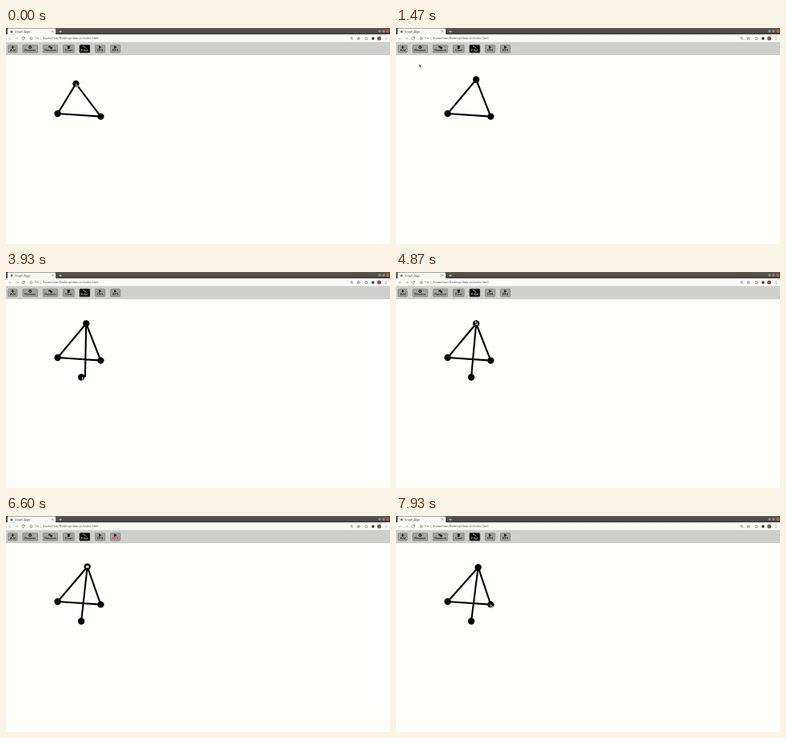
These frames come from a looping animation (480 by 270 pixels, 8000 ms). An HTML page:

```html
<!DOCTYPE html>
<html lang="en">
<head>
<meta charset="utf-8">
<title>Graph Algo</title>
<style>
  html, body { margin: 0; width: 100%; height: 100%; overflow: hidden; background: #fefefb; }
  svg { display: block; width: 100vw; height: 100vh; }
  text { font-family: "Open Sans", "Noto Sans", sans-serif; font-size: 3.7px; fill: #4a4a47; }
  .btn rect { fill: #a1a19d; stroke: #72726e; stroke-width: .6; }
  .btn text { font: bold 3.6px "Liberation Sans", sans-serif; fill: #2b2b29; text-anchor: middle; }
  .btn path { fill: none; stroke: #111; stroke-width: .9; }
  .btn .solid { fill: #111; stroke: none; }
  .btn.on rect { fill: #050505; stroke: #222; }
  .btn.on text { fill: #a5a5a1; }
  .btn.on path { stroke: #b5b5b0; }
  .btn.busy rect { fill: #414b5c; stroke: #2c3442; }
  .btn.busy text { fill: #141b28; }
  .btn.red text { fill: #e2382c; }
  .edge { stroke: #000; stroke-width: 2.1; }
  .ui { fill: none; stroke: #666662; stroke-width: .6; }
</style>
</head>
<body>
<svg viewBox="0 0 480 270" preserveAspectRatio="none">
  <defs>
    <linearGradient id="bar" x2="0" y2="1">
      <stop stop-color="#5a5950"/><stop offset="1" stop-color="#45443d"/>
    </linearGradient>
  </defs>
  <rect width="480" height="270" fill="#fefefb"/>
  <rect width="480" height="8" fill="url(#bar)"/>
  <path d="M1 8Q2 8 2 7V2Q2 .6 3.5 .6H60.5Q62 .6 62 2V7Q62 8 63 8Z" fill="#f8f8f5"/>
  <circle cx="7" cy="4.500" r="1.500" fill="#777773"/>
  <text x="10.800" y="5.800">Graph Algo</text>
  <path class="ui" d="M57 3.300l2 2m0-2l-2 2"/>
  <path d="M66.200 4.500h3.600M68 2.700v3.600" stroke="#d5d5ce" stroke-width=".6"/>
  <circle cx="467" cy="4" r="1.800" fill="#8a897f"/>
  <circle cx="472" cy="4" r="1.800" fill="#8a897f"/>
  <circle cx="477" cy="4" r="1.900" fill="#cf5a3c"/>

  <rect y="8" width="480" height="9.500" fill="#fbfbf8"/>
  <path class="ui" d="M7 13H3.500m1.500-1.500L3.500 13 5 14.500M11.500 13H15m-1.500-1.500L15 13l-1.500 1.500" opacity=".55"/>
  <path class="ui" d="M23 12a1.700 1.700 0 1 0 .2 1.500M23.300 10.900V12.400h-1.500"/>
  <circle class="ui" cx="31.500" cy="13" r="1.600"/>
  <path class="ui" d="M31.500 12.800v1"/>
  <path class="ui" d="M43.700 11v4" opacity=".5"/>
  <text x="35.800" y="14.300" fill-opacity=".75">File</text>
  <text x="45.800" y="14.300">/home/tom/Desktop/data-vis/index.html</text>
  <circle class="ui" cx="432" cy="12.700" r="1.300"/>
  <path class="ui" d="M433 13.700l1.200 1.200"/>
  <path class="ui" d="M440.500 11.200l.5 1.300h1.300l-1 .9.4 1.300-1.200-.8-1.200.8.400-1.300-1-.9h1.300z"/>
  <rect class="ui" x="449" y="11.700" width="3" height="2.800" rx=".6"/>
  <rect x="457.200" y="11.500" width="3.200" height="3.200" rx=".7" fill="#3d3d3a"/>
  <circle cx="466.500" cy="13" r="2.500" fill="#7d544b"/>
  <path d="M475 11v.8m0 .8v.8m0 .8v.8" stroke="#555" stroke-width=".8"/>

  <rect y="17.500" width="480" height="16.500" fill="#cfcfcb"/>
  <g id="tools"></g>
  <g id="edges"></g>
  <g id="nodes"></g>
  <g id="cursor">
    <path id="arrow" d="M0 0V4.300l1-.9.7 1.500.8-.4-.7-1.400h1.300z" fill="#222" stroke="#fff" stroke-width=".6"/>
    <rect id="hand" x="-2" y="-1.400" width="4" height="2.800" rx="1" fill="#fff" stroke="#444" stroke-width=".6"/>
  </g>
</svg>
<script>
const LOOP = 8000, STEP = 200 / 3;
const $ = id => document.getElementById(id);

function add(parent, tag, attrs, text) {
  const el = document.createElementNS("http://www.w3.org/2000/svg", tag);
  set(el, attrs);
  if (text) el.textContent = text;
  return parent.appendChild(el);
}
function set(el, attrs) {
  for (const k in attrs) el.setAttribute(k, attrs[k]);
}
function show(el, on) {
  el.style.display = on ? "" : "none";
}

// Toolbar: buttons follow each other with an even gap.
const icons = {
  Add: "M-2 0H2M0 -2V2",
  Remove: "M-1.6 0a1.6 1.6 0 1 0 3.2 0a1.6 1.6 0 1 0 -3.2 0M-.8 0H.8",
  Random: "M-2.3 -1.6H.4V.6H-2.3ZM-.2 -.4H2.4V1.8H-.2Z",
  Clear: "M-1.5 -1H1.5L1.2 2H-1.2ZM-1.9 -1.9H1.9V-1.3H-1.9Z",
  Edge: "M-2.2 -1.7L2.2 1.7",
  DFS: "M-1.5 -1.9L2 0L-1.5 1.9Z",
  BFS: "M-1.5 -1.9L2 0L-1.5 1.9Z"
};
const widths = { Add: 11.4, Remove: 18.6, Random: 18.3, Clear: 13.8, Edge: 12.8, DFS: 12.2, BFS: 12.2 };
const btns = {}, spot = {};
let x = 2.7;
for (const label in icons) {
  const w = widths[label], mid = x + w / 2;
  const g = btns[label] = add($("tools"), "g", { class: "btn" });
  add(g, "rect", { x, y: 21.2, width: w, height: 9.6, rx: .8 });
  add(g, "path", {
    d: icons[label],
    class: icons[label].endsWith("Z") ? "solid" : "",
    transform: `translate(${mid} 24)`
  });
  add(g, "text", { x: mid, y: 29.3 }, label);
  spot[label] = [mid, 25];
  x += w + 6.8;
}
btns.Edge.classList.add("on");

Object.assign(spot, {
  left: [64.6, 107], right: [118.4, 110.6], low: [94.1, 131.5],
  start: [87.4, 69.6], nudged: [89.3, 67.2], raised: [100.2, 64.5],
  pulled: [101.7, 63.5], last: [102.7, 64.2],
  aside: [102.3, 66], away: [29, 45], drop: [95.4, 131.3], rim: [99.3, 61.5]
});

// Moves: start ms, end ms, goal, sideways bend
const topMoves = [
  [130, 530, "nudged"], [870, 1130, "raised"], [5270, 5530, "pulled"], [6600, 6800, "last"]
];
const mouseMoves = [
  [130, 530, "nudged"], [670, 870, "aside"], [870, 1130, "raised"], [1130, 1470, "away"],
  [1530, 1870, "Add"], [1930, 2330, "low"], [2600, 3200, "Edge", 14],
  [3270, 3530, "raised"], [3530, 3930, "drop"], [4130, 4470, "Edge"],
  [4600, 4870, "rim"], [5000, 5530, "pulled"], [5530, 5800, "Edge"], [6070, 6330, "pulled"],
  [6600, 6800, "last"], [6800, 7330, "BFS", 22], [7400, 7930, "right"]
];

function glide(moves, t) {
  let [x, y] = spot.start;
  for (const [from, to, goal, bend = 0] of moves) {
    if (t <= from) break;
    const k = Math.min(1, (t - from) / (to - from));
    const ease = k * k * (3 - 2 * k);
    x += (spot[goal][0] - x) * ease + bend * Math.sin(Math.PI * k);
    y += (spot[goal][1] - y) * ease;
  }
  return [x, y];
}

const edges = [0, 1, 2, 3].map(() => add($("edges"), "line", { class: "edge" }));
const nodes = [0, 1, 2, 3].map(() => add($("nodes"), "circle", { r: 4.2 }));

function join(el, [x1, y1], [x2, y2]) {
  set(el, { x1, y1, x2, y2 });
}

function draw(ms) {
  const t = Math.floor((ms + 5) / STEP) * STEP;
  const within = (a, b) => t >= a - 5 && t < b - 5;
  const { left, right, low } = spot;
  const tip = glide(topMoves, t);
  const [mx, my] = glide(mouseMoves, t);

  join(edges[0], left, right);
  join(edges[1], left, tip);
  join(edges[2], right, tip);
  join(edges[3], tip, t < 4130 ? [mx + 3.5, my] : low);
  show(edges[3], t > 3530);

  [left, right, tip, low].forEach(([cx, cy], i) => set(nodes[i], { cx, cy }));
  show(nodes[3], t > 2320);

  btns.Add.classList.toggle("busy", within(1930, 3200));
  btns.BFS.classList.toggle("red", within(6530, 7400));

  const hand = within(800, 1000) || within(6530, 6800);
  set($("cursor"), { transform: `translate(${mx} ${my})` });
  show($("cursor"), !within(2400, 2670));
  show($("hand"), hand);
  show($("arrow"), !hand);
}

function tick() {
  draw(performance.now() % LOOP);
  requestAnimationFrame(tick);
}
tick();
</script>
</body>
</html>
```
